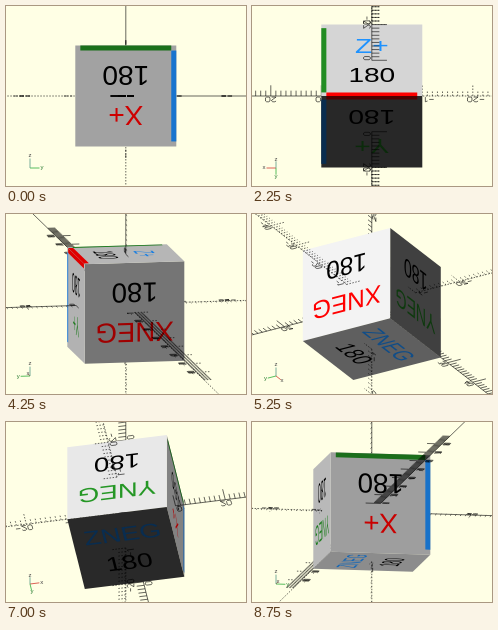
Recreate the animation shown at these times as an HTML page with a canvas. Size 240 by 180 pixels, loop 9000 ms.

```html
<!DOCTYPE html>
<html lang="en">
<head>
<meta charset="utf-8">
<title>Turning cube</title>
<style>
html, body { margin: 0; width: 100%; height: 100%; overflow: hidden; background: #ffffe5; }
canvas { display: block; width: 240px; height: 180px; }
</style>
</head>
<body>
<canvas id="view" width="240" height="180"></canvas>
<script>
const ctx = document.getElementById('view').getContext('2d');

const STEPS = 36, STEP_MS = 250;
const CX = 119.8, CY = 90;
const UNIT = 5.05;          // pixels per model unit
const HALF = 10;            // half the cube's side
const REACH = 90;           // length of the ruled part of each axis
const TICK = REACH / 60;
const FONT = '"Liberation Sans", Arial, sans-serif';

const RED = [255, 0, 0], GREEN = [34, 139, 34], BLUE = [30, 144, 255];

// n: outward normal, r: text direction, u: text up
const FACES = [
  { name: 'X+',   n: [1, 0, 0],  r: [0, -1, 0], u: [0, 0, -1], ink: RED },
  { name: 'XNEG', n: [-1, 0, 0], r: [0, 1, 0],  u: [0, 0, -1], ink: RED },
  { name: 'Y+',   n: [0, 1, 0],  r: [1, 0, 0],  u: [0, 0, -1], ink: GREEN },
  { name: 'YNEG', n: [0, -1, 0], r: [-1, 0, 0], u: [0, 0, -1], ink: GREEN },
  { name: 'Z+',   n: [0, 0, 1],  r: [-1, 0, 0], u: [0, -1, 0], ink: BLUE },
  { name: 'ZNEG', n: [0, 0, -1], r: [1, 0, 0],  u: [0, -1, 0], ink: BLUE }
];

// Coloured edges: the two faces that meet there
const EDGES = [
  { a: [1, 0, 0], b: [0, 0, 1], ink: GREEN },
  { a: [0, 1, 0], b: [0, 0, 1], ink: RED },
  { a: [1, 0, 0], b: [0, 1, 0], ink: BLUE }
];

// Stroke digits on a 4 by 6 grid
const GLYPHS = {
  '0': '10 30 41 45 36 16 05 01 10',
  '1': '05 26 20',
  '2': '05 16 36 45 44 00 40',
  '3': '06 46 24 34 43 41 30 10 01',
  '4': '30 36 02 42',
  '5': '46 06 03 33 42 41 30 00',
  '6': '36 04 01 10 30 41 42 33 03',
  '7': '06 46 10',
  '8': '13 33 44 45 36 16 05 04 13 02 01 10 30 41 42 33',
  '-': '03 43'
};

const dot = (a, b) => a[0] * b[0] + a[1] * b[1] + a[2] * b[2];
const mix = (...terms) => [0, 1, 2].map(i => terms.reduce((s, [v, k]) => s + v[i] * k, 0));
const cross = (a, b) => [
  a[1] * b[2] - a[2] * b[1], a[2] * b[0] - a[0] * b[2], a[0] * b[1] - a[1] * b[0]
];
const rgb = c => `rgb(${c.map(v => Math.min(255, Math.round(v))).join(',')})`;

let cam;

function setCamera(turn) {
  const tilt = Math.atan(Math.sin(turn));
  const c = Math.cos(turn), s = Math.sin(turn), ct = Math.cos(tilt), st = Math.sin(tilt);
  cam = { right: [-s, c, 0], up: [-st * c, -st * s, ct], eye: [ct * c, ct * s, st] };
}

const project = p => [CX + dot(p, cam.right) * UNIT, CY - dot(p, cam.up) * UNIT];

function moveLine(a, b) {
  ctx.moveTo(...project(a));
  ctx.lineTo(...project(b));
}

function fillShape(points, colour) {
  ctx.beginPath();
  points.forEach(p => ctx.lineTo(...project(p)));
  ctx.closePath();
  ctx.fillStyle = colour;
  ctx.fill();
}

const lit = n =>
  Math.abs(dot(n, cam.eye) + dot(n, cam.up) - dot(n, cam.right)) / Math.sqrt(3);

function planeText(text, centre, r, u, colour) {
  const [x, y] = project(centre);
  const k = UNIT * 0.0556;   // 100px type scaled to a cap height of 4 units
  ctx.save();
  ctx.transform(dot(r, cam.right) * k, -dot(r, cam.up) * k,
                -dot(u, cam.right) * k, dot(u, cam.up) * k, x, y);
  ctx.font = '100px ' + FONT;
  ctx.textAlign = 'center';
  ctx.fillStyle = colour;
  ctx.fillText(text, 0, 35);
  ctx.restore();
}

function drawFace({ name, n, r, u, ink }) {
  if (dot(n, cam.eye) < 1e-6) return;
  const light = lit(n);
  const tint = c => rgb(c.map(v => v * (0.31 + 0.86 * light)));
  const at = (x, y) => mix([n, HALF], [r, x], [u, y]);
  const grey = 40 + 212 * light;
  fillShape([at(-HALF, -HALF), at(HALF, -HALF), at(HALF, HALF), at(-HALF, HALF)],
            rgb([grey, grey, grey]));

  for (const { a, b, ink: bar } of EDGES) {
    const side = dot(a, n) === 1 ? b : dot(b, n) === 1 ? a : null;
    if (!side) continue;
    const along = cross(n, side);
    const corner = (d, l) => mix([n, HALF], [side, d], [along, l]);
    fillShape([corner(HALF, -9), corner(HALF, 9), corner(9, 9), corner(9, -9)], tint(bar));
  }
  planeText(name, at(0, 4), r, u, tint(ink));
  planeText('180', at(0, -4), r, u, '#000');
}

// Labels sit beside the axis, opposite the ticks
function axisLabel(axis, value) {
  const text = String(value), cell = 0.22, step = 5.5 * cell;
  const digits = String(Math.abs(value)).length;
  const start = value - (digits * step - 1.5 * cell) / 2 - (text.length - digits) * step;
  const dir = [0, 0, 0];
  dir[axis] = 1;
  const place = (x, y) => axis === 0
    ? [x, 0.3 + y, 0]
    : mix([dir, x], [[1, 0, 0], 0.3 + 6 * cell - y]);
  [...text].forEach((ch, i) => {
    const pts = GLYPHS[ch].split(' ').map(q => [start + i * step + q[0] * cell, q[1] * cell]);
    for (let j = 1; j < pts.length; j++) {
      const [a, b] = [pts[j - 1], pts[j]];
      if (Math.abs(a[0] + b[0]) / 2 >= HALF) moveLine(place(...a), place(...b));
    }
  });
}

function drawAxis(axis, sign, front) {
  const dir = [0, 0, 0];
  dir[axis] = sign;
  const arm = axis === 0 ? [0, -1, 0] : [-1, 0, 0];
  const from = front ? HALF : 0;
  ctx.strokeStyle = '#000';
  ctx.lineWidth = 0.6;

  ctx.setLineDash(sign < 0 ? [1.5, 1.5] : []);
  ctx.beginPath();
  moveLine(mix([dir, from]), mix([dir, 1000]));
  for (let i = from; i < REACH; i++) {
    const size = i && i % 10 === 0 ? TICK * 2 : TICK;
    moveLine(mix([dir, i]), mix([dir, i], [arm, size]));
  }
  ctx.stroke();

  ctx.setLineDash([]);
  ctx.beginPath();
  for (let i = 10; i < REACH; i += 10) axisLabel(axis, sign * i);
  ctx.stroke();
}

function drawAxes(front) {
  for (let axis = 0; axis < 3; axis++)
    for (const sign of [1, -1])
      if ((cam.eye[axis] * sign > 1e-6) === front) drawAxis(axis, sign, front);
}

function drawCompass() {
  const x = 24, y = 162;
  ctx.font = '6px ' + FONT;
  ctx.textAlign = 'center';
  ctx.textBaseline = 'middle';
  ctx.lineWidth = 0.8;
  ['#d33a30', '#2fae3c', '#5a9a8a'].forEach((colour, i) => {
    const dx = cam.right[i], dy = -cam.up[i];
    ctx.strokeStyle = colour;
    ctx.beginPath();
    ctx.moveTo(x, y);
    ctx.lineTo(x + dx * 9.5, y + dy * 9.5);
    ctx.stroke();
    if (Math.hypot(dx, dy) < 0.01) return;
    ctx.fillStyle = i === 1 ? '#2a7a32' : '#444';
    ctx.fillText('xyz'[i], x + dx * 12, y + dy * 12 - 0.5);
  });
  ctx.textBaseline = 'alphabetic';
}

let shown = -1;
function tick(now) {
  const step = Math.floor(now / STEP_MS) % STEPS;
  if (step !== shown) {
    shown = step;
    setCamera(step / STEPS * 2 * Math.PI);
    ctx.fillStyle = '#ffffe5';
    ctx.fillRect(0, 0, 240, 180);
    drawAxes(false);
    FACES.forEach(drawFace);
    drawAxes(true);
    drawCompass();
  }
  requestAnimationFrame(tick);
}
tick(performance.now());
</script>
</body>
</html>
```
